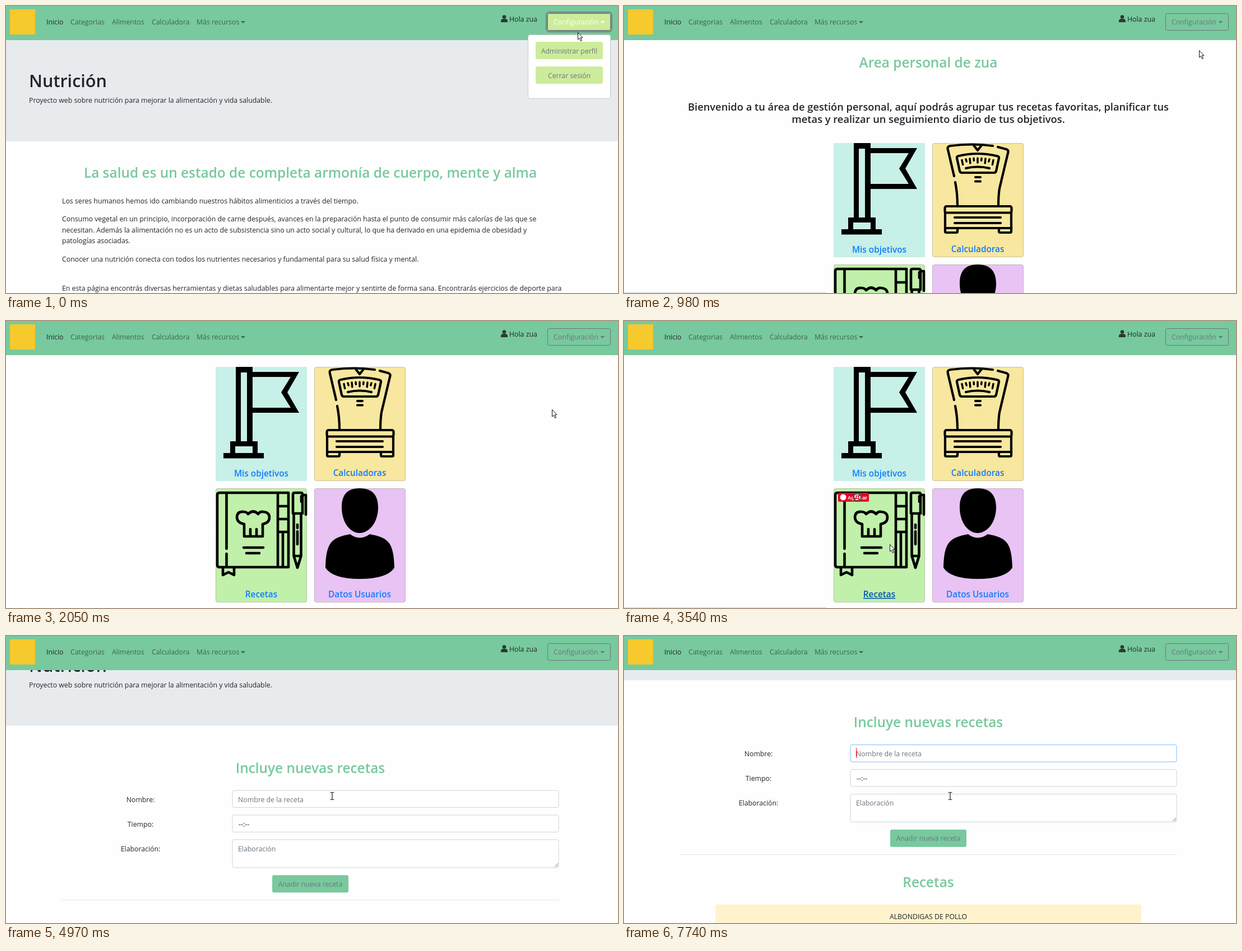
Write an HTML page that moves like this. It is 1092x513 px and loops after 8 s.

```html
<!DOCTYPE html>
<html lang="es">
<head>
<meta charset="utf-8">
<title>Nutrición</title>
<style>
html, body { margin: 0; width: 100%; height: 100%; overflow: hidden; background: #fefefe; }
svg { display: block; width: 1092px; height: 513px; }
text { font: 12.3px "Open Sans", "Noto Sans", sans-serif; fill: #212529; }
.h1, .h2, .h4, .h5 { font-weight: 600; }
.h1 { font-size: 30.6px; }
.h2 { font-size: 24.4px; fill: #78c99d; }
.h4 { font-size: 18.3px; }
.h5 { font-size: 15.3px; fill: #127bff; }
.mid { text-anchor: middle; }
.mute { fill: #6c757d; }
.dim { fill: #3c6550; }
.hover { fill: #0056b3; text-decoration: underline; }
.field { fill: #fff; stroke: #ced4da; }
.line { fill: none; stroke: #000; stroke-linecap: round; stroke-linejoin: round; }
.ptr { fill: #fff; stroke: #111; stroke-linejoin: round; }
</style>
</head>
<body>
<svg viewBox="0 0 1092 513">
  <defs>
    <g id="banner">
      <path d="M0 61H1092V238q0 4-4 4H0z" fill="#e8ebee"/>
      <text class="h1" x="41" y="145">Nutrición</text>
      <text x="41" y="173">Proyecto web sobre nutrición para mejorar la alimentación y vida saludable.</text>
    </g>
    <path id="caret" d="M0 0h8l-4 4z"/>
  </defs>

  <g id="home">
    <use href="#banner"/>
    <text class="h2 mid" x="543" y="307">La salud es un estado de completa armonía de cuerpo, mente y alma</text>
    <text x="100" y="353">Los seres humanos hemos ido cambiando nuestros hábitos alimenticios a través del tiempo.</text>
    <text x="100" y="385">Consumo vegetal en un principio, incorporación de carne después, avances en la preparación hasta el punto de consumir más calorías de las que se</text>
    <text x="100" y="405">necesitan. Además la alimentación no es un acto de subsistencia sino un acto social y cultural, lo que ha derivado en una epidemia de obesidad y</text>
    <text x="100" y="424">patologías asociadas.</text>
    <text x="100" y="457">Conocer una nutrición conecta con todos los nutrientes necesarios y fundamental para su salud física y mental.</text>
    <text x="100" y="509">En esta página encontrás diversas herramientas y dietas saludables para alimentarte mejor y sentirte de forma sana. Encontrarás ejercicios de deporte para</text>
  </g>

  <g id="area">
    <text class="h2 mid" x="543" y="110">Area personal de zua</text>
    <text class="h4 mid" x="543" y="187">Bienvenido a tu área de gestión personal, aquí podrás agrupar tus recetas favoritas, planificar tus</text>
    <text class="h4 mid" x="543" y="209">metas y realizar un seguimiento diario de tus objetivos.</text>
    <g transform="translate(0 163)">
      <path fill="#c6f0e8" d="M374 82h163v204H374z"/>
      <g stroke="#000" stroke-opacity=".2">
        <rect x="550.5" y="82.5" width="162" height="203" rx="3" fill="#f7e79f"/>
        <rect x="374.5" y="299.5" width="162" height="203" rx="3" fill="#c0f0a9"/>
        <rect x="550.5" y="299.5" width="162" height="203" rx="3" fill="#e8c3f3"/>
      </g>
      <!-- flag -->
      <path fill-rule="evenodd" d="M410 82h30v9h83l-21 36.500 21 36.500h-83v51h9v21h11v9.500h-72v-9.500h12v-21h10zM419 92v123h11V92zM440 100v55h68l-17-27.500 17-27.500zM409 224v12h31v-12z"/>
      <!-- scale -->
      <g class="line" stroke-width="4.200">
        <path d="M589 141L578 94Q576 88 582 87Q622 82 658 87M667 89L682 93Q687 95 685 100L670 163Q668 176 668 193M591 152Q595 172 595 193M624 86L631 95L638 86"/>
        <path d="M594 109Q593 106 597 105Q631 97 665 105Q670 106 669 109L664 132Q663 135 660 135H603Q600 135 599 132z"/>
        <path d="M610 127Q631 122 652 127M627 143h9M627 150.500h9M590 215h82M590 225h82"/>
        <rect x="572.500" y="195" width="119" height="11.500" rx="3"/>
        <path d="M573 206.500V240q0 2 2 2h18q2 0 2-2v-6M691 206.500V240q0 2-2 2h-18q-2 0-2-2v-6M573 234h118"/>
        <path id="ticks" stroke-width="3.500"/>
      </g>
      <!-- recipe book -->
      <g class="line" stroke-width="4.600">
        <path d="M504 377V440H381q-4 0-4-4V311q0-4 4-4H504zM393.500 309V407M393.500 416V440M485 307V440M485 331h19M485 354h19M485 377h19M494 380V438"/>
        <path d="M387 441V454L397 449L407 454V441M512 344V310q0-3 3-3h11q3 0 3 3V344zM531 311h4V346M513.500 345V420L520 441L526.500 420V345M513.500 420h13M520 364v6M520 376v23M527 313v10"/>
        <path d="M425 385V363Q412 361 412 350Q413 340 424 341Q429 341 432 345Q441 336 450 345Q453 340 459 341Q470 342 470 351Q470 361 458 363V385zM436 372v11M447 372v11M424 405h35M429 415h23"/>
      </g>
      <!-- person -->
      <path d="M631 299C655 299 664 313 664 333C664 360 648 379 631 379C614 379 599 360 599 333C599 313 607 299 631 299zM614 381Q631 394 649 381C680 387 692 393 693 441Q680 461 631 461Q583 461 570 441C571 393 583 387 614 381z"/>
      <text class="h5 mid" x="455.500" y="278">Mis objetivos</text>
      <text class="h5 mid" x="631" y="277">Calculadoras</text>
      <text class="h5 mid" x="455.500" y="494" id="recipes">Recetas</text>
      <text class="h5 mid" x="631" y="494" id="users">Datos Usuarios</text>
      <g id="save">
        <rect x="8" y="8" width="55" height="16" rx="2" fill="#e60023"/>
        <circle cx="17" cy="16" r="5.500" fill="#fff"/>
        <text x="25" y="19.500" style="font:bold 9px 'Liberation Sans',sans-serif;fill:#fff">Agrupar</text>
        <circle cx="42.500" cy="16" r="8.500" fill="#5a4a4c" fill-opacity=".85"/>
        <rect x="38.500" y="12" width="8" height="8" rx="2" fill="#e60023" stroke="#fff" stroke-width="2" stroke-dasharray="5 2.500" stroke-dashoffset="1"/>
        <circle cx="42.500" cy="16" r="1.700" fill="#fff"/>
      </g>
    </g>
  </g>

  <g id="form">
    <use href="#banner"/>
    <text class="h2 mid" x="543" y="326">Incluye nuevas recetas</text>
    <text class="mid" x="240" y="378">Nombre:</text>
    <text class="mid" x="240" y="422">Tiempo:</text>
    <text class="mid" x="240" y="466">Elaboración:</text>
    <rect class="field" id="name" x="404" y="357.500" width="582" height="30.500" rx="3"/>
    <rect class="field" x="404" y="401.500" width="582" height="30.500" rx="3"/>
    <rect class="field" x="404" y="445.500" width="582" height="50" rx="3"/>
    <path d="M979 494l6-6M983 494l2-2" stroke="#666"/>
    <text class="mute" x="414" y="378">Nombre de la receta</text>
    <text x="415" y="422" fill="#495057">--:--</text>
    <text class="mute" x="414" y="466">Elaboración</text>
    <path id="typing" d="M414.500 363v18" stroke="#f00"/>
    <rect x="475" y="509" width="136" height="31" rx="3" fill="#78c99d"/>
    <text class="mute mid" x="543" y="529">Anadir nueva receta</text>
    <path d="M100 553.500H987" stroke="#e5e5e5"/>
    <text class="h2 mid" x="543" y="612">Recetas</text>
    <rect x="163" y="643" width="760" height="50" rx="3" fill="#fff3cd"/>
    <text class="mid" x="543" y="669">ALBONDIGAS DE POLLO</text>
  </g>

  <path fill="#78c99d" d="M0 0H1092V61H0z"/>
  <path fill="#f6c92c" d="M7 6h45v45H7z"/>
  <text x="72" y="33">Inicio</text>
  <text class="dim" x="115" y="33">Categorias</text>
  <text class="dim" x="189" y="33">Alimentos</text>
  <text class="dim" x="260" y="33">Calculadora</text>
  <text class="dim" x="340" y="33">Más recursos</text>
  <use href="#caret" x="419" y="27" fill="#3c6550"/>
  <g fill="#2b3a33">
    <circle cx="889" cy="19.500" r="3.300"/>
    <path d="M883 29v-2q0-4 4-4h4q4 0 4 4v2z"/>
  </g>
  <text x="898" y="28">Hola zua</text>
  <rect id="ring" x="964.500" y="11.500" width="116" height="34" rx="5" fill="none" stroke="#6c757d" stroke-opacity=".65" stroke-width="3.500"/>
  <rect id="fill" x="966" y="13" width="113" height="31" rx="3" fill="#cdec9b"/>
  <rect id="edge" x="966.500" y="13.500" width="112" height="30" rx="3" fill="none" stroke="#6c757d"/>
  <g id="config">
    <text x="977" y="33" style="fill:inherit">Configuración</text>
    <use href="#caret" x="1060.500" y="27"/>
  </g>

  <g id="menu">
    <rect x="931.500" y="51.500" width="147" height="114" rx="4" fill="#fff" stroke="#c8cbcd"/>
    <rect x="945" y="64" width="120" height="31" rx="3" fill="#cdec9b"/>
    <rect x="945" y="108" width="120" height="31" rx="3" fill="#cdec9b"/>
    <text class="mid" id="profile" x="1005" y="85">Administrar perfil</text>
    <text class="mute mid" x="1005" y="129">Cerrar sesión</text>
  </g>

  <path id="status" d="M0 512.500H361" stroke="#cfd1d3"/>

  <g id="cursor">
    <path class="ptr" id="arrow" d="M.5 .5V13L3.300 10.400L5.500 15.500L7.500 14.600L5.400 9.600H9z"/>
    <path class="ptr" id="hand" d="M-1 11V2Q-1 .5 .3 .5T1.600 2V7Q4 6 4.300 8Q6.300 7 6.700 9Q8.700 8.500 8.700 10.500V14Q8.500 16 7 19.500H-1Q-2 16.500-4.300 13.500Q-5 11.500-3.600 11Q-2.500 11-1 13z"/>
    <path id="beam" d="M-3.500-6.500h2.500l1 1 1-1h2.500M0-5.500V5.500M-3.500 6.500h2.500l1-1 1 1h2.500" fill="none" stroke="#222" stroke-width="1.200"/>
  </g>
</svg>
<script>
const LOOP = 8000;
const $ = id => document.getElementById(id);
const show = (id, on) => $(id).style.display = on ? '' : 'none';
const move = (id, x, y) => $(id).setAttribute('transform', `translate(${x} ${y})`);
const paint = (id, prop, value) => $(id).style[prop] = value;

// latest entry whose time has been reached
const at = (list, t) => list.filter(k => k[0] <= t).pop();

// time, x, y, shape (kept until the next one)
const pointer = [
  [0, 1020, 47, 'arrow'], [150, 1021, 70, 'hand'], [300, 1023, 77, 'hand'],
  [560, 1026, 79, 'arrow'], [1100, 1026, 85, 'arrow'], [1250, 1031, 110, 'arrow'],
  [1400, 1026, 118, 'arrow'], [1527, 1008, 135, 'arrow'], [1653, 988, 150, 'arrow'],
  [1780, 974, 158, 'arrow'], [2340, 950, 190, 'arrow'], [2465, 872, 244, 'arrow'],
  [2590, 776, 294, 'arrow'], [2730, 650, 340, 'hand'], [2880, 528, 376, 'hand'],
  [3003, 494, 392, 'hand'], [3127, 480, 397, 'hand'], [3250, 474, 399, 'hand'],
  [3540, 474, 399, 'arrow'], [3690, 474, 399, 'hand'], [4250, 473, 396, 'arrow'],
  [4400, 510, 309, 'arrow'], [4550, 580, 285, 'arrow'], [4970, 582, 286, 'beam']
];
const scroll = [
  [0, 0], [1400, 14], [1527, 54], [1653, 81], [1780, 98], [1930, 145], [2050, 163],
  [3690, 0], [4700, 45], [4820, 81.500], [7610, 126], [7740, 163]
];

let ticks = '';
for (let i = -4; i <= 4; i++) {
  const x = 631 + i * 7, y = 109 + i * i * .22;
  ticks += `M${x} ${y}l${-i * .4} ${i % 2 ? 4 : 8}`;
}
$('ticks').setAttribute('d', ticks);

function draw(t) {
  const page = t < 980 ? 'home' : t < 3690 ? 'area' : 'form';
  const top = at(scroll, t)[1];
  for (const id of ['home', 'area', 'form']) show(id, id === page);
  move(page, 0, -top);

  // navbar menu
  show('menu', t < 700);
  show('ring', t < 830);
  show('fill', t < 830);
  paint('ring', 'opacity', t < 700 ? 1 : .5);
  paint('fill', 'opacity', t < 700 ? 1 : .5);
  paint('config', 'fill', t < 150 ? '#fff' : '#6c757d');
  paint('profile', 'fill', t < 150 ? '#6c757d' : t < 300 ? '#b5babe' : '#fff');

  // hovered card
  const onUsers = t >= 2730 && t < 2880, onRecipes = t >= 2880;
  $('users').classList.toggle('hover', onUsers);
  $('recipes').classList.toggle('hover', onRecipes);
  show('save', onUsers || onRecipes);
  move('save', onUsers ? 550 : 374, 299);

  // form focus and blinking caret
  const focus = t >= 6800;
  paint('name', 'stroke', focus ? '#80bdff' : '');
  show('typing', focus && (t < 7200 || t >= 7610));

  show('status', t >= 560 && t < 1100 || t >= 3390 && t < 4110);

  const [, x, y, shape] = at(pointer, t);
  move('cursor', x, y);
  for (const id of ['arrow', 'hand', 'beam']) show(id, id === shape);
}

const start = performance.now();
function frame(now) {
  draw(Math.max(0, now - start) % LOOP);
  requestAnimationFrame(frame);
}
draw(0);
requestAnimationFrame(frame);
</script>
</body>
</html>
```
